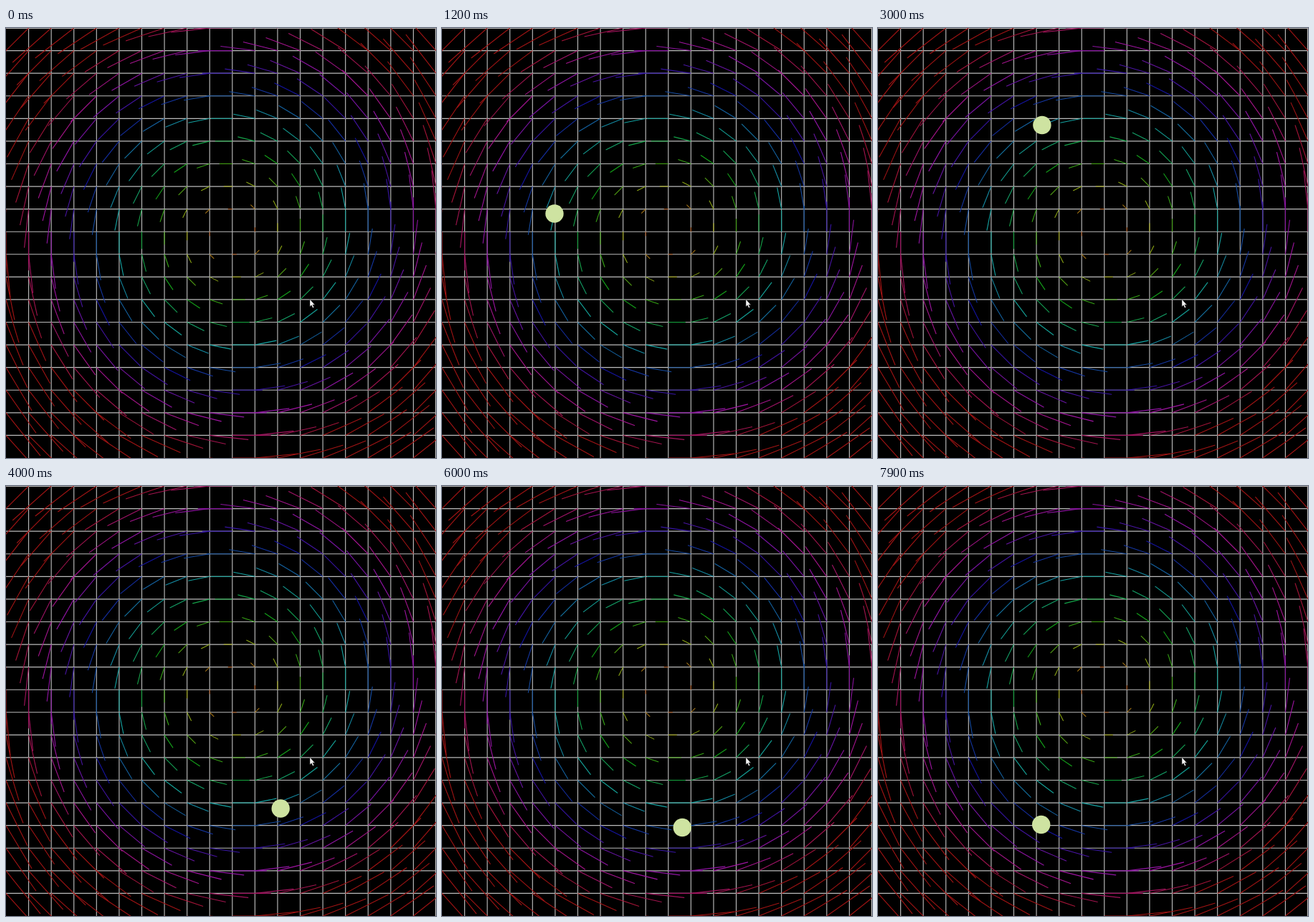
Recreate the animation shown at these times as an HTML page. Size 600 by 600 pixels, loop 8000 ms.

```html
<!DOCTYPE html>
<html lang="en">
<head>
<meta charset="utf-8">
<title>Vortex field</title>
<style>
html, body { margin: 0; width: 100%; height: 100%; overflow: hidden; background: #000; }
svg { display: block; width: 100vw; height: 100vh; }
</style>
</head>
<body>
<svg viewBox="0 0 600 600">
  <g id="grid" stroke="#bababa" stroke-width="1.15"></g>
  <g id="field" stroke-width="1.1"></g>
  <circle id="ball" r="12.7" fill="#cee3a1"/>
  <path d="M424 378.5v10.2l2.2-1.9 1.8 3.7 1.7-.8-1.8-3.5h3z" fill="#f2f2f2" stroke="#222" stroke-width=".4"/>
</svg>
<script>
const LOOP = 8000, STEP = 100;
const CELLS = 19, CELL = 600 / CELLS;
const CENTER = { x: 10 * CELL, y: 9 * CELL };
const STRENGTH = 0.19;
const byId = id => document.getElementById(id);

function addLine(parent, x1, y1, x2, y2, stroke) {
  const line = document.createElementNS("http://www.w3.org/2000/svg", "line");
  const attrs = { x1, y1, x2, y2 };
  if (stroke) attrs.stroke = stroke;
  for (const name in attrs) line.setAttribute(name, attrs[name]);
  parent.append(line);
}

// The stage is closed by a line at the top and right edges only.
function drawGrid() {
  for (let i = 0; i < CELLS; i++) {
    const x = Math.min(599.5, (i + 1) * CELL), y = Math.max(0.5, i * CELL);
    addLine(byId("grid"), x, 0, x, 600);
    addLine(byId("grid"), 0, y, 600, y);
  }
}

// Each grid point carries a vector turned a quarter turn from its radius.
function drawField() {
  for (let i = 0; i <= CELLS; i++) {
    for (let j = 0; j <= CELLS; j++) {
      const x = i * CELL, y = j * CELL;
      const dx = x - CENTER.x, dy = y - CENTER.y;
      const radius = Math.hypot(dx, dy);
      if (radius < 1) continue;
      const hue = Math.max(0, Math.min(360, 1.2 * radius - 14));
      addLine(byId("field"), x, y, x + STRENGTH * dy, y - STRENGTH * dx, `hsl(${hue} 78% 36%)`);
    }
  }
}

// The ball spirals slowly outwards while it circles the center.
function ballAt(seconds) {
  const radius = 160.8 * Math.exp(0.0383 * (seconds - 1.2));
  const degrees = 189 - 171.83 * (seconds - 1.2) - 1.4 * Math.max(0, seconds - 6);
  const angle = degrees * Math.PI / 180;
  return { x: CENTER.x + radius * Math.cos(angle), y: CENTER.y + radius * Math.sin(angle) };
}

function update(ms) {
  const time = Math.floor(ms % LOOP / STEP) * STEP;
  const ball = byId("ball"), { x, y } = ballAt(time / 1000);
  ball.setAttribute("cx", x);
  ball.setAttribute("cy", y);
  ball.setAttribute("visibility", time < STEP ? "hidden" : "visible");
}

drawGrid();
drawField();
const start = performance.now();
function tick() {
  update(performance.now() - start);
  requestAnimationFrame(tick);
}
tick();
</script>
</body>
</html>
```
